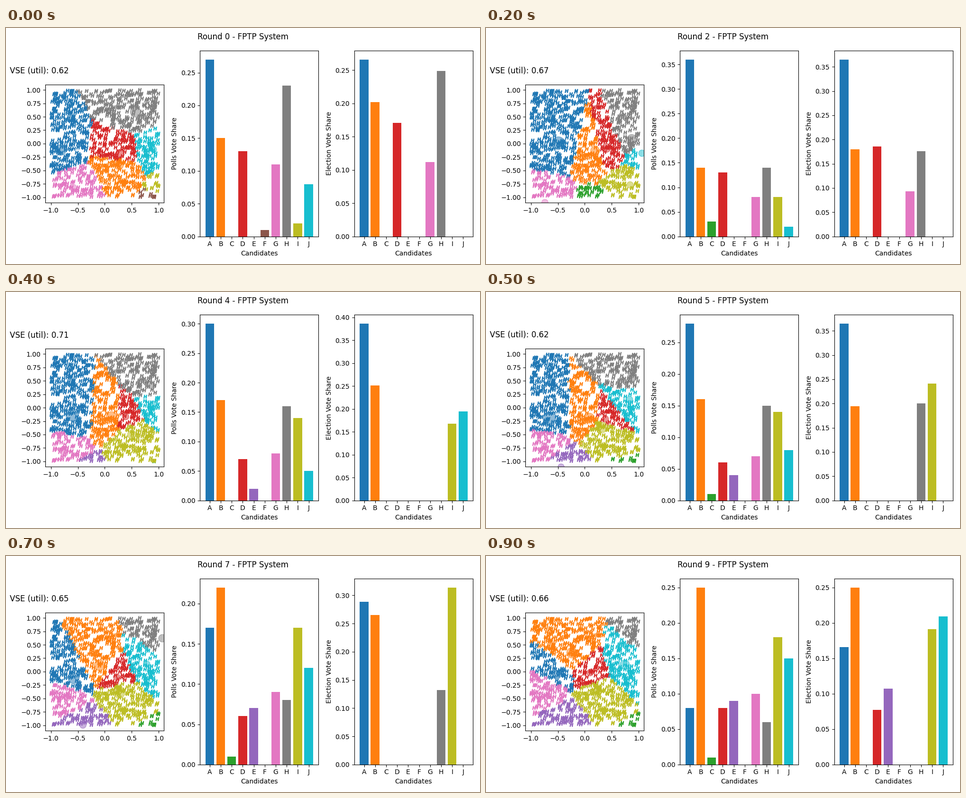
Animation of 1000 by 500 pixels, one loop 1000 ms. Source, as a matplotlib script:

```python
import numpy as np
import matplotlib.pyplot as plt
from matplotlib.animation import FuncAnimation

NAMES = list("ABCDEFGHIJ")
COLORS = np.array(plt.get_cmap("tab10").colors)
N_VOTERS = 1000

# Voter opinions are points x + yj in the square from -1 to 1.
rng = np.random.default_rng(7)
VOTERS = rng.uniform(-1, 1, N_VOTERS) + 1j * rng.uniform(-1, 1, N_VOTERS)

# Candidates drift straight between four waypoints.
WAYPOINTS = [0, 2, 5, 8.5]
PATHS = {
    "A": [-.82 - .12j, -.49 + .01j, -.66 - .20j, -.52 - .06j],
    "B": [.26 - .40j, .19 - .13j, .09 - .19j, -.24 + .35j],
    "C": [.26 - 1.76j, .26 - 1.36j, .62 - 1.55j, .84 - 1.56j],
    "D": [.28 - .19j, .40 - .08j, .38 - .21j, .10 - .02j],
    "E": [-.51 - 1.36j, -.60 - 1.61j, -.44 - 1.11j, -.38 - .91j],
    "F": [1.21 - 1.05j, 1.29 - 1.35j, 1.51 - 1.57j, 1.51 - 1.57j],
    "G": [-.59 - .82j, -.74 - 1.10j, -.75 - .72j, -.66 - .31j],
    "H": [.57 + .59j, .87 + .09j, .88 + .57j, 1.21 + .66j],
    "I": [1.25 - .82j, .84 - .77j, .33 - .37j, .22 - .40j],
    "J": [.90 - .11j, 1.06 - .18j, .83 + .15j, .74 + .13j],
}

# Satisfaction score and the candidates still viable on election day.
ROUNDS = [
    (0.62, "ABDGH"), (0.64, "ABDGH"), (0.67, "ABDGH"), (0.69, "ABDGH"),
    (0.71, "ABIJ"), (0.62, "ABHI"), (0.64, "ABHI"), (0.65, "ABHI"),
    (0.65, "BGIJ"), (0.66, "ABDEIJ"),
]


def nearest(sites, running):
    """Index of the closest running candidate for every voter."""
    ids = np.array([NAMES.index(c) for c in running])
    return ids[np.abs(VOTERS[:, None] - sites[ids]).argmin(axis=1)]


def shares(choice):
    return np.bincount(choice, minlength=len(NAMES)) / N_VOTERS


def draw_map(ax, sites, favourite, votes, vse):
    ax.scatter(VOTERS.real, VOTERS.imag, s=25, c=COLORS[favourite], marker="$H$")
    ax.scatter(sites.real, sites.imag, s=1000 * np.maximum(votes, 0.1),
               c=COLORS, alpha=0.5)
    ax.set(xlim=(-1.1, 1.1), ylim=(-1.1, 1.1), aspect="equal")
    ax.text(-0.3, 1.15, f"VSE (util): {vse:.2f}", transform=ax.transAxes,
            fontsize=12, va="top")


def draw_bars(ax, values, label):
    ax.bar(NAMES, values, color=COLORS)
    ax.set(xlabel="Candidates", ylabel=label)


def update(n):
    vse, viable = ROUNDS[n]
    sites = np.array([np.interp(n, WAYPOINTS, PATHS[c]) for c in NAMES])
    favourite = nearest(sites, NAMES)
    votes = shares(nearest(sites, viable))

    fig.clear()
    fig.subplots_adjust(left=0.125, right=0.9, bottom=0.11, top=0.88,
                        wspace=0.2, hspace=0.2)
    area, polls, election = fig.subplots(1, 3)
    draw_map(area, sites, favourite, votes, vse)
    draw_bars(polls, shares(favourite).round(2), "Polls Vote Share")
    draw_bars(election, votes, "Election Vote Share")
    fig.suptitle(f"Round {n} - FPTP System")
    fig.tight_layout()
    return []


fig = plt.figure(figsize=(10, 5), dpi=100)
anim = FuncAnimation(fig, update, frames=len(ROUNDS), interval=100, repeat=True)
plt.show()
```
